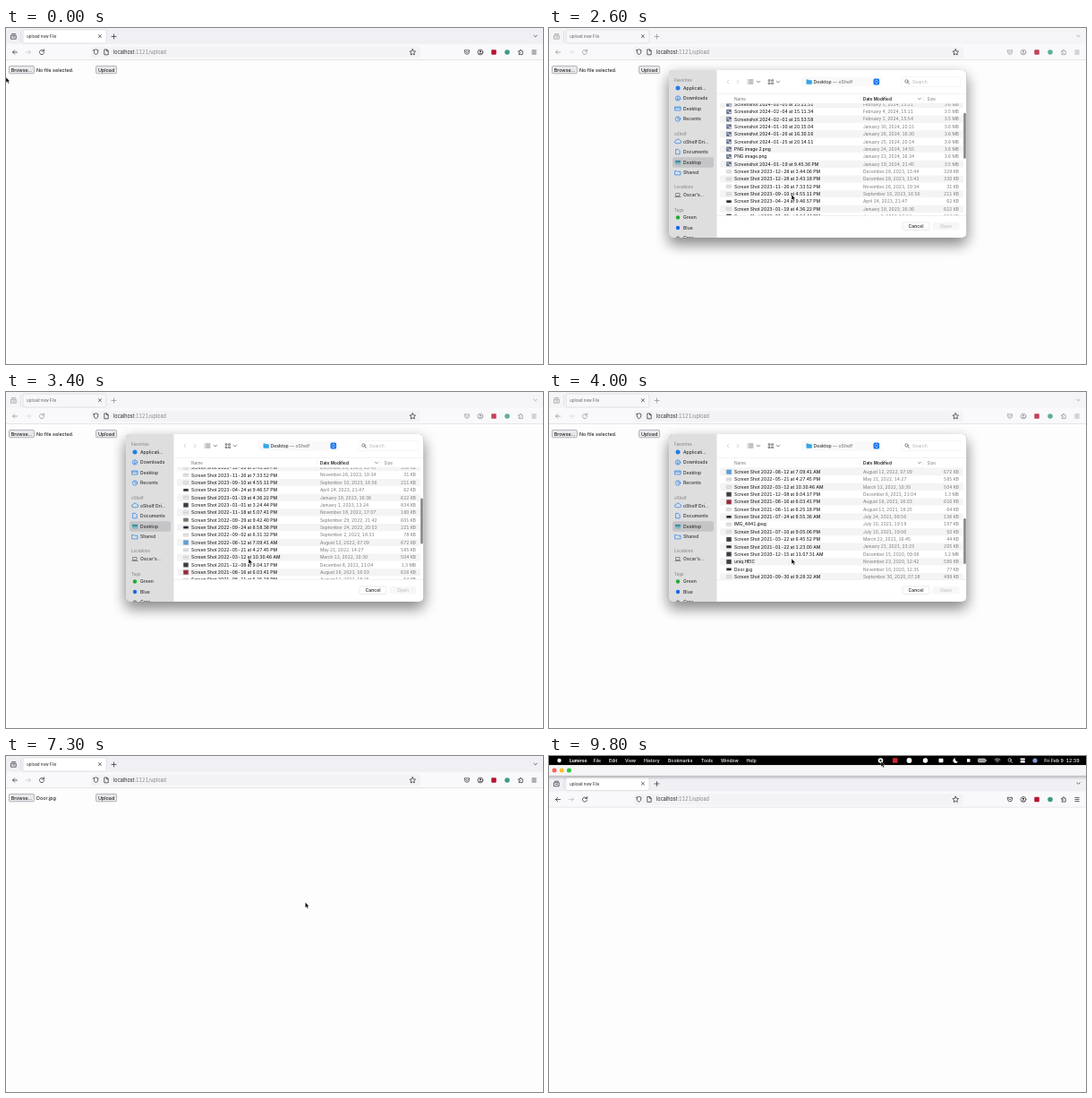
An HTML page that plays this animation: 600 px wide and 375 px high, repeating every 9.9 s.

```html
<!DOCTYPE html>
<html lang="en">
<head>
<meta charset="utf-8">
<title>File upload</title>
<style>
html, body { margin: 0; width: 100%; height: 100%; overflow: hidden; background: #fdfdfd; }
svg { display: block; width: 600px; height: 375px; font-family: Inter, Roboto, sans-serif; }
text { white-space: pre; font-variant-numeric: tabular-nums; }
.line { fill: none; stroke-width: .7; stroke-linecap: round; stroke-linejoin: round; }
#panel { filter: drop-shadow(0 7px 8px rgba(0, 0, 0, .36)) drop-shadow(0 0 .5px rgba(0, 0, 0, .5)); }
</style>
</head>
<body>
<svg id="stage" viewBox="0 0 600 375"></svg>
<script>
const LOOP = 9900, ROW = 8.35, INK = '#25252b', BLUE = '#0a5bdc';

// SVG helpers; text is centred vertically on y
const rect = (x, y, w, h, fill, r = 0, more = '') =>
  `<rect x="${x}" y="${y}" width="${w}" height="${h}" rx="${r}" fill="${fill}" ${more}/>`;
const dot = (x, y, r, fill) => `<circle cx="${x}" cy="${y}" r="${r}" fill="${fill}"/>`;
const ring = (x, y, r, color = INK) => `<circle class="line" cx="${x}" cy="${y}" r="${r}" stroke="${color}"/>`;
const line = (d, color = INK, more = '') => `<path class="line" d="${d}" stroke="${color}" ${more}/>`;
const text = (x, y, s, size, fill = '#222', more = '') =>
  `<text x="${x}" y="${y + size * .36}" font-size="${size}" fill="${fill}" ${more}>${s}</text>`;
const group = (id, body, more = '') => `<g id="${id}" ${more}>${body}</g>`;
const bold = 'font-weight="600"', medium = 'font-weight="500"';
const chevron = (x, y, color = INK) => line(`M${x - 1.7} ${y - .8}l1.7 1.7 1.7-1.7`, color);
const lens = (x, y, color) => ring(x, y, 1.7, color) + line(`M${x + 1.3} ${y + 1.3}l1.7 1.7`, color);

// '+' and '*' stand for the two screenshot prefixes
const files = `+2024-02-08 at 16.21.37|Yesterday, 16:21|3.6 MB
+2024-02-08 at 09.57.50|Yesterday, 09:58|3.6 MB
+2024-02-06 at 15.16.29|February 6, 2024, 15:16|3.6 MB
+2024-02-05 at 15.21.51|February 5, 2024, 15:21|3.6 MB
+2024-02-04 at 15.11.34|February 4, 2024, 15:11|3.5 MB
+2024-02-01 at 15.53.58|February 1, 2024, 15:54|3.5 MB
+2024-01-30 at 20.15.04|January 30, 2024, 20:15|3.6 MB
+2024-01-26 at 16.30.16|January 26, 2024, 16:30|3.6 MB
+2024-01-25 at 20.14.11|January 25, 2024, 20:14|3.6 MB
PNG image 2.png|January 24, 2024, 14:55|3.6 MB
PNG image.png|January 23, 2024, 16:34|3.6 MB
+2024-01-19 at 9.45.36 PM|January 19, 2024, 21:45|3.5 MB
*2023-12-28 at 3.44.06 PM|December 28, 2023, 13:44|329 KB
*2023-12-28 at 3.43.18 PM|December 28, 2023, 13:43|330 KB
*2023-11-26 at 7.33.52 PM|November 26, 2023, 19:34|31 KB
*2023-09-10 at 4.55.11 PM|September 10, 2023, 16:56|211 KB
*2023-04-24 at 9.46.57 PM|April 24, 2023, 21:47|62 KB
*2023-01-19 at 4.36.22 PM|January 19, 2023, 16:36|622 KB
*2023-01-01 at 3.24.44 PM|January 1, 2023, 13:24|834 KB
*2022-11-18 at 5.07.41 PM|November 18, 2022, 17:07|180 KB
*2022-09-29 at 9.42.40 PM|September 29, 2022, 21:42|601 KB
*2022-09-24 at 8.58.38 PM|September 24, 2022, 20:53|221 KB
*2022-09-02 at 6.31.32 PM|September 2, 2022, 18:31|78 KB
*2022-08-12 at 7.09.41 AM|August 12, 2022, 07:09|672 KB
*2022-05-21 at 4.27.45 PM|May 21, 2022, 14:27|585 KB
*2022-03-12 at 10.30.46 AM|March 12, 2022, 10:30|504 KB
*2021-12-08 at 9.04.17 PM|December 8, 2021, 21:04|1.3 MB
*2021-08-16 at 6.03.41 PM|August 16, 2021, 16:03|616 KB
*2021-08-11 at 6.25.18 PM|August 11, 2021, 18:25|64 KB
*2021-07-24 at 8.55.36 AM|July 24, 2021, 06:56|136 KB
IMG_4841.jpeg|July 10, 2021, 19:19|197 KB
*2021-07-10 at 9.05.06 PM|July 10, 2021, 19:06|50 KB
*2021-03-22 at 6.45.52 PM|March 22, 2021, 16:45|44 KB
*2021-01-22 at 1.23.00 AM|January 21, 2021, 23:23|205 KB
*2020-12-15 at 11.07.31 AM|December 15, 2020, 09:08|1.2 MB
uniq.HEIC|November 23, 2020, 12:42|590 KB
Door.jpg|November 10, 2020, 12:35|77 KB
*2020-09-30 at 9.28.32 AM|September 30, 2020, 07:28|499 KB`.split('\n').map(row => row.split('|'));

// One letter per file: fill and height of its thumbnail
const thumbs = 'nnnnnnnnnnnnwwwwkwpwgkwbwwprwkwwpkppkw';
const thumbStyle = {
  n: ['#5d6983', 5], w: ['#eef0f2', 3.4], k: ['#24262b', 2.8],
  p: ['#3a3d42', 5], g: ['#7d706c', 4], r: ['#9a2638', 5], b: ['#5c9fd8', 5]
};
const DOOR = files.findIndex(f => f[0] === 'Door.jpg');

function fileRow(i, chosen) {
  const y = 91.2 + i * ROW, [name, date, size] = files[i], kind = thumbs[i];
  const soft = chosen ? '#fff' : '#777', [color, h] = thumbStyle[kind];
  const label = name.replace('+', 'Screenshot ').replace('*', 'Screen Shot ');
  const back = chosen ? BLUE : i % 2 ? '#f4f4f5' : '#fff';
  return rect(191, y - ROW / 2, 272, ROW, back, 1.5) +
    rect(198.2, y - h / 2, 5.6, h, color, .4, 'stroke="#a5a8ad" stroke-width=".4"') +
    (kind === 'n' ? dot(200.2, y - .6, 1.1, '#a9bad6') + rect(201, y + .3, 2.5, 1.5, '#dfe5ef') : '') +
    (kind === 'w' ? rect(199, y - .3, 4, .5, '#aaa') : '') +
    text(207, y, label, 4.9, chosen ? '#fff' : '#222', medium) +
    text(351, y, date, 4.8, soft) + text(458, y, size, 4.8, soft, 'text-anchor="end"');
}

function browser() {
  const icons =
    line('M5.8 8.2h5.4v4h-5.4zM6.5 6.7h4M7.5 10h2') +
    line('M7.5 27h5M9.7 24.8l-2.2 2.2 2.2 2.2') + line('M22.5 27h5M25.3 24.8l2.2 2.2-2.2 2.2', '#bbb') +
    group('reload', line('M42.2 25.6a2.6 2.6 0 1 0 .4 2M42.5 24v2h-2')) +
    line('M118 9.5h5M120.5 7v5') + chevron(591.5, 9) +
    line('M512.5 24.8h5v2a2.5 2.5 0 0 1-5 0zM513.8 26.3l1.2 1.2 1.2-1.2') +
    ring(530, 27, 2.9) + dot(530, 26.2, 1, INK) + line('M528.4 28.8q1.6-1.6 3.2 0') +
    line('M573 25.8h1.2v-.8a.8.8 0 0 1 1.6 0v.8h1.4v3.8h-4.2v-1.2h.6a.8.8 0 0 0 0-1.6h-.6z') +
    line('M587.8 25h4.4M587.8 27h4.4M587.8 29h4.4');
  return rect(0, 0, 600, 18.3, '#f0f0f4', 0, 'id="strip"') +
    rect(0, 18, 600, 17.6, '#f9f9fb') + rect(0, 35.3, 600, .6, '#d9d9de') +
    rect(16.2, 3, .5, 13, '#cfcfd6') +
    rect(19, 2, 93, 15, '#fff', 1.5, 'id="tab" stroke="#cacad2" stroke-width=".5"') +
    group('tabName', text(23, 9.5, 'upload new File', 4.5)) + line('M103.4 7.7l3 3M106.4 7.7l-3 3') +
    rect(95, 20.8, 368, 12.4, '#f3f3f6', 1.6) +
    line('M98 24.8l2.5-1 2.5 1q0 4-2.5 5.2-2.5-1.2-2.5-5.2z') +
    line('M110.2 24h2.4l1.6 1.6v4.2h-4zM112.5 24v1.7h1.6') +
    text(120, 27, 'localhost<tspan fill="#85858c">:1121/upload</tspan>', 5.5, '#202024') +
    line('M454.3 23.7l1 2.1 2.3.3-1.7 1.6.4 2.3-2-1.1-2 1.1.4-2.3-1.7-1.6 2.3-.3z') +
    group('icons', icons) +
    group('badges', rect(542.3, 24.2, 5.5, 5.5, '#b51531', .7) + dot(560, 27, 2.8, '#3c9c80'));
}

function form() {
  const button = (id, x, w, s) =>
    rect(x, 42.4, w, 8.4, '#e9e9ed', 1.4, `id="${id}" stroke="#85858f" stroke-width=".6"`) +
    text(x + w / 2, 46.6, s, 5.4, '#000', 'text-anchor="middle"');
  return button('browse', 3.4, 28, 'Browse...') + button('upload', 100.6, 23, 'Upload') +
    `<text id="chosen" x="34" y="48.5" font-size="5.45"></text>`;
}

function sidebar() {
  const head = (y, s) => text(140, y, s, 4.5, '#8b8b8e', medium);
  const item = (y, s, icon) => icon + text(150, y, s, 5.1, '#333', medium);
  const blue = d => line(d, '#1f7fe8');
  const gray = d => line(d, '#666');
  return rect(134, 47, 53.5, 187, '#dededf') + rect(138, 144.2, 46, 11.6, '#c5c5c7', 2) +
    head(58, 'Favorites') +
    item(67, 'Applicati...', dot(144, 67, 2.5, '#1f7fe8')) +
    item(78.5, 'Downloads', ring(144, 78.5, 2.7, '#1f7fe8') + blue('M144 77v3M142.8 79l1.2 1.2 1.2-1.2')) +
    item(90, 'Desktop', blue('M141 88h6v4h-6zM141 89.2h6')) +
    item(101.5, 'Recents', ring(144, 101.5, 2.7, '#1f7fe8') + blue('M144 99.8v1.8h1.4')) +
    head(118, 'oShelf') +
    item(126.7, 'oShelf Dri...', blue('M142 128.7a1.5 1.5 0 0 1 0-3 2.2 2.2 0 0 1 4.2-.2 1.6 1.6 0 0 1 0 3.2z')) +
    item(138.2, 'Documents', blue('M142 135.4h2.6l1.5 1.5v4h-4.1z')) +
    item(150, 'Desktop', rect(141, 147.8, 6, 4.4, '#448f9f', .5) + rect(141, 150.7, 6, .7, '#dff')) +
    item(161.5, 'Shared', blue('M141 159.6h2l.7.7h3.3v3.6h-6z')) +
    head(177.7, 'Locations') +
    item(186.5, "Oscar's...", gray('M142 184.5h4v3h-4zM140.8 188.5h6.4')) +
    head(203, 'Tags') +
    item(211.5, 'Green', dot(144, 211.5, 2.2, '#1fae2c')) +
    item(223, 'Blue', dot(144, 223, 2.2, '#1767ee')) +
    item(234.5, 'Gray', dot(144, 234.5, 2.2, '#8b8b8e'));
}

function dialog() {
  const gray = '#777';
  return rect(134, 47, 332.5, 187, '#fff', 5) + `<g clip-path="url(#frame)">` + sidebar() +
    line('M201 58l-2 2 2 2M210 58l2 2-2 2', '#c4c4c4') +
    line('M223.5 58h4.5M223.5 60h4.5M223.5 62h4.5M222 58h.1M222 60h.1M222 62h.1', '#555') + chevron(234, 60, '#555') +
    line('M245.5 57.8h1.5v1.5h-1.5zM249 57.8h1.5v1.5h-1.5zM245.5 61h1.5v1.5h-1.5zM249 61h1.5v1.5h-1.5z', '#555') +
    chevron(256, 60, '#555') +
    rect(282, 54.5, 90, 11, '#f9f9fa', 2) +
    `<path d="M287.5 57.5h2.3l.7.8h3.3v4.4h-6.3z" fill="#35a5e6"/>` +
    text(295.5, 60, 'Desktop <tspan fill="#777">— oShelf</tspan>', 5.1, '#333', medium) +
    rect(362.5, 56.6, 6.6, 6.8, '#1675ee', 1.5) + line('M364.6 59.2l1.2-1.2 1.2 1.2M364.6 60.8l1.2 1.2 1.2-1.2', '#fff') +
    rect(394, 54.5, 66, 11, '#fff', 2, 'stroke="#ececee" stroke-width=".5"') +
    lens(399.5, 59.5, '#555') + text(406, 60, 'Search', 5, '#b0b0b3') +
    rect(187.5, 73, 279, .4, '#e3e3e5') +
    text(207, 79, 'Name', 4.7, gray) + text(351, 79, 'Date Modified', 4.7, '#222', bold) +
    chevron(414, 79, gray) + text(422.5, 79, 'Size', 4.7, gray) +
    [347, 418].map(x => rect(x, 76, .4, 6, '#ddd')).join('') + rect(191, 84, 272, .4, '#dedee0') +
    `<g clip-path="url(#view)">` +
    group('list', files.map((f, i) => fileRow(i)).join('') + group('picked', fileRow(DOOR, true))) + '</g>' +
    rect(463.2, 86, 2.6, 51, '#858587', 1.3, 'id="thumb"') +
    rect(187.5, 209, 279, .4, '#dcdcde') +
    rect(395, 217, 30, 8.6, '#fff', 1.8, 'stroke="#d5d5d8" stroke-width=".5"') +
    text(410, 221.3, 'Cancel', 5.1, '#222', 'text-anchor="middle" ' + medium) +
    rect(428.5, 217, 30, 8.6, '#f7f7f8', 1.8, 'id="open"') +
    `<text id="openText" x="443.5" y="223.1" font-size="5.1" text-anchor="middle">Open</text></g>`;
}

function menuBar() {
  const white = '#fff';
  const names = [[49.5, 'File'], [67, 'Edit'], [85, 'View'], [106, 'History'], [133, 'Bookmarks'],
    [170, 'Tools'], [192, 'Window'], [220.5, 'Help']];
  return rect(0, 21.5, 600, 5, 'url(#shade)') + rect(0, 0, 600, 10.3, '#000') + rect(0, 10.2, 600, 11.5, '#f5f5f7') +
    ['#ff5f57', '#febc2e', '#28c840'].map((c, i) => dot(6 + i * 8.2, 16, 2.5, c)).join('') +
    dot(11.5, 5, 2.2, white) + text(23, 5, 'Lumiroo', 4.9, white, 'font-weight="700"') +
    names.map(([x, s]) => text(x, 5, s, 5.1, white, medium)).join('') +
    dot(370.5, 5, 2.8, white) + dot(370.5, 5, 1.2, '#333') +
    rect(384, 2.2, 5.5, 5.5, '#d3242f', .6) +
    dot(402.5, 5, 2.9, white) + dot(420.5, 5, 2.7, white) + rect(435.5, 2.8, 5, 4.4, white, 1) +
    `<path d="M454 2.3a2.8 2.8 0 1 0 2.7 3.8 2.8 2.8 0 0 1-2.7-3.8z" fill="#fff"/>` +
    rect(467, 3.2, 3.5, 3.5, white) +
    rect(479.5, 3, 8, 4, '#999', 1, 'stroke="#fff" stroke-width=".5"') + rect(488.2, 4.2, .7, 1.6, white) +
    line('M498 4q3-2.4 6 0M499.3 5.5q1.7-1.4 3.4 0M501 7h.1', white) + lens(514.7, 4.5, white) +
    rect(526.5, 2.5, 5.5, 2.1, white, 1) + rect(526.5, 5.3, 5.5, 2.1, white, 1) + dot(543, 5, 2.6, '#829bd5') +
    text(592.5, 5, 'Fri Feb 9  12:39', 5.2, white, 'text-anchor="end" ' + medium);
}

const stage = document.getElementById('stage');
stage.innerHTML =
  `<defs><clipPath id="frame">${rect(134, 47, 332.5, 187, '#000', 5)}</clipPath>
   <clipPath id="view">${rect(188, 84.4, 278, 124.6, '#000')}</clipPath>
   <linearGradient id="shade" x2="0" y2="1"><stop stop-opacity=".25"/><stop offset="1" stop-opacity="0"/></linearGradient></defs>` +
  group('form', form()) + group('chrome', browser()) + group('menu', menuBar()) + group('panel', dialog()) +
  group('cursor', '<path d="M0 0v6l1.4-1.2 1 2.2 1.1-.5-1-2.1h1.9z" fill="#000" stroke="#fff" stroke-width=".4"/>');

const el = id => document.getElementById(id);
const set = (id, name, value) => el(id).setAttribute(name, value);
const show = (id, on) => set(id, 'visibility', on ? 'visible' : 'hidden');

// Linear track through [time, ...values]
function track(keys, t) {
  const next = keys.findIndex(k => k[0] > t);
  if (next < 0) return keys[keys.length - 1].slice(1);
  if (!next) return keys[0].slice(1);
  const a = keys[next - 1], b = keys[next], p = (t - a[0]) / (b[0] - a[0]);
  return a.slice(1).map((v, i) => v + (b[i + 1] - v) * p);
}
const pointer = [[800, 0, 55], [1000, 26, 46], [1700, 26, 46], [1800, 81, 70], [2100, 81, 70], [2300, 271, 186],
  [4500, 271, 186], [4700, 271, 195], [5400, 271, 195], [6000, 441, 222], [7000, 441, 222], [7900, 121, 46],
  [8800, 121, 46], [9200, 371, 1], [9400, 371, 1], [9600, 371, 6]];
const scrolling = [[2400, 0], [2900, 78], [3200, 110], [3500, 118], [3900, 194]];
const sliding = [[9200, 0], [9600, 1]];

function draw() {
  const t = Math.floor(performance.now() % LOOP / 100) * 100;
  const open = t >= 1800 && t < 6300, picked = t >= 4900;
  const [scroll] = track(scrolling, t), [slide] = track(sliding, t);

  set('cursor', 'transform', `translate(${track(pointer, t)})`);
  set('chrome', 'transform', `translate(0 ${21.5 * slide})`);
  set('menu', 'transform', `translate(0 ${21.7 * (slide - 1)})`);
  show('menu', slide > 0);

  set('strip', 'fill', open ? '#f5f5f7' : '#f0f0f4');
  set('tab', 'fill', open ? '#f7f7f9' : '#fff');
  set('tabName', 'opacity', open ? .7 : 1);
  set('icons', 'opacity', open ? .5 : 1);
  set('badges', 'opacity', open ? .8 : 1);
  set('reload', 'opacity', t >= 8500 && t < 8900 ? .3 : 1);

  show('form', t < 8900);
  el('chosen').textContent = t >= 6800 && t < 8500 ? 'Door.jpg' : 'No file selected.';
  set('upload', 'fill', t >= 8500 ? '#b9b9c1' : '#e9e9ed');
  set('upload', 'stroke', t >= 8500 ? '#5b5b66' : '#85858f');

  set('panel', 'display', open ? 'inline' : 'none');
  set('list', 'transform', `translate(0 ${-scroll})`);
  set('picked', 'display', picked ? 'inline' : 'none');
  set('thumb', 'display', scroll ? 'inline' : 'none');
  set('thumb', 'y', 85.8 + scroll * .2845);
  set('open', 'fill', picked ? '#1668e8' : '#f7f7f8');
  set('openText', 'fill', picked ? '#fff' : '#b8b8bb');
  requestAnimationFrame(draw);
}
draw();
</script>
</body>
</html>
```
